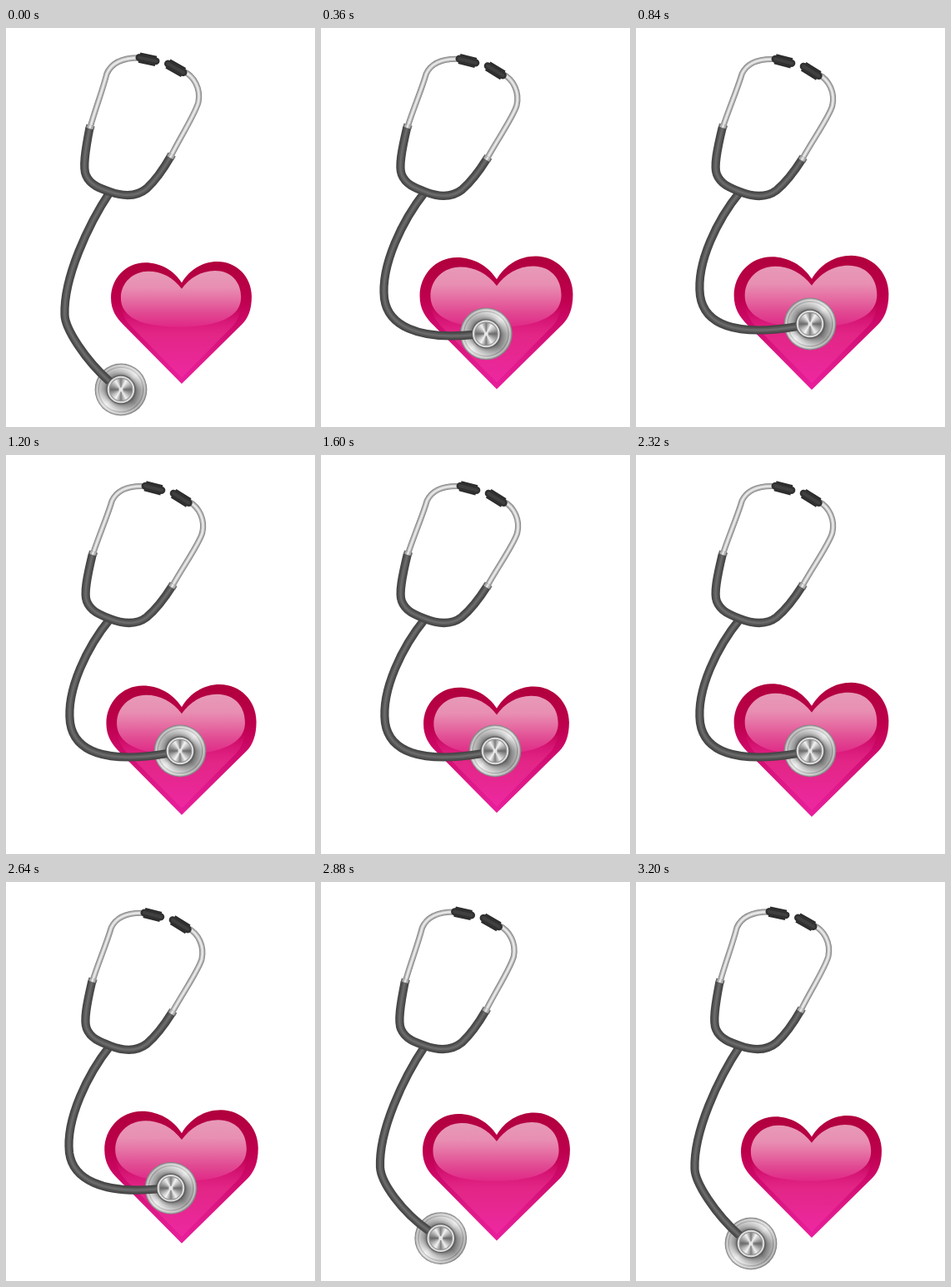
Recreate the animation shown at these times as an HTML page with a canvas. Size 371 by 480 pixels, loop 3240 ms.

```html
<!DOCTYPE html>
<html lang="en">
<head>
<meta charset="utf-8">
<title>Stethoscope and heart</title>
<style>
html, body { margin: 0; width: 100%; height: 100%; overflow: hidden; background: #fff; }
canvas { display: block; }
</style>
</head>
<body>
<canvas id="stage" width="371" height="480"></canvas>
<script>
const ctx = document.getElementById('stage').getContext('2d');
const LOOP = 3240;
const path = d => new Path2D(d);
const mix = (a, b, k) => a + (b - a) * k;
const ease = (t, from, to) => {
  const k = Math.min(1, Math.max(0, (t - from) / (to - from)));
  return (1 - Math.cos(Math.PI * k)) / 2;
};

function withStops(gradient, stops) {
  stops.forEach(([at, color]) => gradient.addColorStop(at, color));
  return gradient;
}
const vertical = (y0, y1, stops) => withStops(ctx.createLinearGradient(0, y0, 0, y1), stops);
const radial = (r0, r1, stops) => withStops(ctx.createRadialGradient(0, 0, r0, 0, 0, r1), stops);

// Layered strokes, wide to narrow, give a round tube.
const RUBBER = [[10.2, '#444'], [8, '#4c4c4c'], [5, '#5c5c5c'], [2, '#6c6c6c']];
const STEEL = [[7.2, '#858585'], [5.6, '#a8a8a8'], [3.6, '#cfcfcf'], [1.6, '#ececec']];
const TIP = [[12.5, '#2b2b2b'], [9, '#333'], [4, '#444']];
const RING = [[10.5, '#6f6f6f'], [7, '#b0b0b0'], [2.5, '#e4e4e4']];

function tube(shape, layers, cap = 'butt') {
  ctx.lineCap = cap;
  ctx.lineJoin = 'round';
  for (const [width, color] of layers) {
    ctx.lineWidth = width;
    ctx.strokeStyle = color;
    ctx.stroke(shape);
  }
}

const heart = path('M211 302C201 286 183 275.5 163 275.5C137 275.5 118 297 118 322C118 338 125 348 134 357L211 435L290.5 356.5C298 349 303 338 303 320C303 294 283 274 258 274C238 274 221 285 211 302Z');
const gloss = path('M211 310C200 295 184 287 167 287C147 287 131 302 131 322C131 340 145 350 162 355C190 362 232 362 258 354C277 348 289 338 289 321C289 300 275 286 255 286C236 286 221 296 211 310Z');
const heartFill = vertical(274, 434, [[0, '#b0003c'], [.3, '#bd004c'], [.52, '#cf0a6c'], [.75, '#dd1886'], [1, '#e81e9c']]);
const glossFill = vertical(286, 359, [[0, '#e79ab6'], [.3, '#e88fb3'], [.5, '#e672a5'], [.75, '#e14b93'], [1, '#e02a87']]);
const lowerFill = vertical(335, 434, [[0, 'rgba(226,36,132,0)'], [.35, '#e22686'], [1, '#ef28a4']]);
const lower = path('M131 325C131 342 136 350 144 359L211 427L279 358C286 350 289 340 289 325Z');

function drawHeart(scale) {
  ctx.save();
  ctx.translate(210.5, 354);
  ctx.scale(scale, scale);
  ctx.translate(-210.5, -354);
  ctx.fillStyle = heartFill;
  ctx.fill(heart);
  ctx.fillStyle = lowerFill;
  ctx.fill(lower);
  ctx.fillStyle = glossFill;
  ctx.fill(gloss);
  ctx.restore();
}

const rubberYoke = path('M100.5 120C95 148 92 168 96 177C101 189 113 193 125 197C142 203 157 203 169 193C182 181 190 168 198 154');
const steelArms = path('M164 36C141 35 127 41 121 55C116 75 107 98 101 120M213 52C226 58 234 73 231 89C228 102 210 130 198 154');
const rings = path('M100.5 121L101.6 117M197 156L199.2 152');
const earTips = path('M160 35.6L180 39.8M194.5 43L213 53.5');

function drawYoke(angle) {
  ctx.save();
  ctx.translate(125, 197);
  ctx.rotate(angle);
  ctx.translate(-125, -197);
  tube(rubberYoke, RUBBER);
  tube(steelArms, STEEL);
  tube(rings, RING);
  tube(earTips, TIP);
  tube(earTips, [[9, '#303030'], [4, '#404040']], 'round');
  ctx.restore();
}

const silver = ['#a0a0a0', '#8a8a8a', '#c4c4c4', '#f4f4f4', '#b4b4b4', '#a6a6a6', '#d0d0d0', '#efefef', '#a0a0a0'];
const wedges = ['#6a6a6a', '#a8a8a8', '#f0f0f0', '#7c7c7c', '#f4f4f4', '#b4b4b4'];
const conic = colors =>
  withStops(ctx.createConicGradient(0, 0, 0), colors.map((c, i) => [i / (colors.length - 1), c]));
const silverFill = conic(silver);
const brushedFill = conic([...wedges, ...wedges, wedges[0]]);
const rimFill = radial(17, 31, [[0, 'rgba(40,40,40,.5)'], [.35, 'rgba(110,110,110,.15)'], [.6, 'rgba(255,255,255,.2)'], [.68, 'rgba(120,120,120,.3)'], [.82, 'rgba(235,235,235,.55)'], [1, 'rgba(110,110,110,.75)']]);

function disc(r, fill) {
  ctx.fillStyle = fill;
  ctx.beginPath();
  ctx.arc(0, 0, r, 0, 2 * Math.PI);
  ctx.fill();
}

function drawDiscs(x, y, discs) {
  ctx.save();
  ctx.translate(x, y);
  discs.forEach(d => disc(...d));
  ctx.restore();
}

const bell = [[31.4, '#858585'], [30.4, silverFill], [30.4, rimFill]];
const hub = [[17.5, '#5c5c5c'], [16.3, '#dedede'], [14.3, '#929292'], [13.2, brushedFill], [2.5, '#e8e8e8']];

// Bezier points of the hose, hanging and pressed on the heart.
const HANGING = [99, 236, 69, 300, 70.5, 345, 71, 362, 95, 399, 124, 425];
const PRESSED = [98, 230, 72, 282, 77, 322, 82, 356, 118, 372, 194, 359];

function drawHose(k) {
  const p = HANGING.map((v, i) => mix(v, PRESSED[i], k));
  tube(path(`M125 197C${p.slice(0, 6)}C${p.slice(6)}`), RUBBER);
}

function heartScale(t) {
  if (t < 840) return mix(.913, 1.004, ease(t, 0, 460));
  if (t < 1560) return mix(1.004, .944, ease(t, 840, 1560));
  if (t < 2500) return mix(.944, 1.004, ease(t, 1560, 2060));
  return mix(1.004, .913, ease(t, 2520, 3220));
}

function draw(t) {
  const k = ease(t, 40, 470) - ease(t, 2530, 2960);
  const x = mix(138, 209, k), y = mix(435, 356, k);
  ctx.clearRect(0, 0, 371, 480);
  drawHeart(heartScale(t));
  drawDiscs(x, y, bell);
  drawHose(k);
  drawDiscs(x, y, hub);
  drawYoke(k * .044);
}

const start = performance.now();
function tick() {
  draw((performance.now() - start) % LOOP);
  requestAnimationFrame(tick);
}
tick();
</script>
</body>
</html>
```
